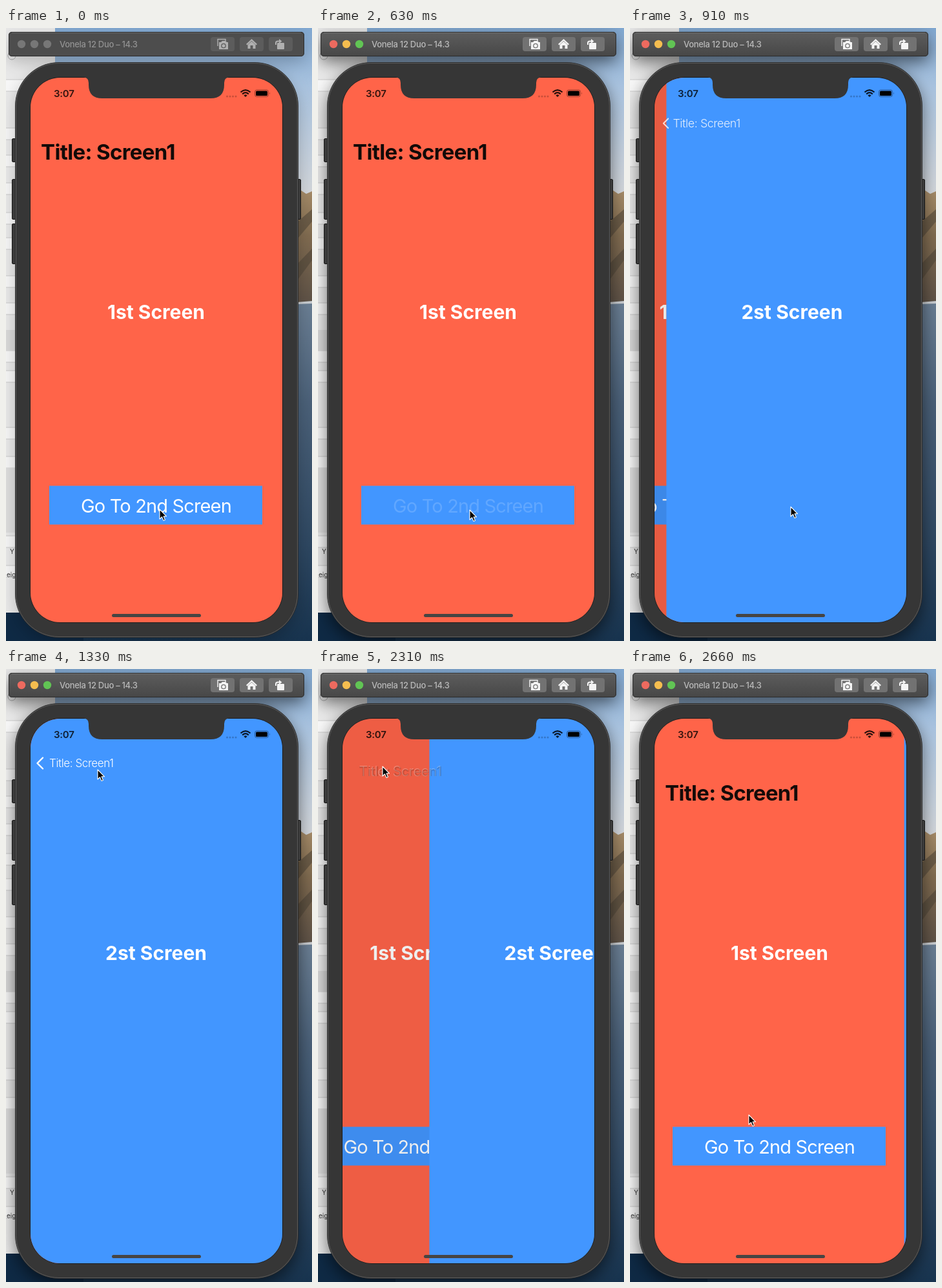
Animation of 474 by 950 pixels, one loop 2730 ms. Source, as an HTML page:

```html
<!DOCTYPE html>
<html lang="en">
<head>
<meta charset="utf-8">
<title>Screen navigation</title>
<style>
  html, body { margin: 0; width: 100%; height: 100%; overflow: hidden; background: #12304e; }
  svg { display: block; width: 474px; height: 950px; font-family: Inter, "Liberation Sans", sans-serif; }
  .heading { font-size: 30px; font-weight: 700; letter-spacing: 0; fill: #fff; text-anchor: middle; }
  .action { font-size: 29px; letter-spacing: -.85px; fill: #fff; text-anchor: middle; }
  .large { font-size: 33px; font-weight: 700; letter-spacing: -.65px; fill: #120a08; }
  .back { font-size: 17px; letter-spacing: -.4px; font-weight: 300; fill: #fff; }
  .clock { font-size: 15px; font-weight: 600; letter-spacing: -.25px; }
  .window { font-size: 13px; font-weight: 500; letter-spacing: -.3px; }
  .small { font-size: 10px; fill: #333; }
</style>
</head>
<body>
<svg viewBox="0 0 474 950" xmlns="http://www.w3.org/2000/svg">
  <defs>
    <linearGradient id="sky" x2="0" y2="1">
      <stop offset="0" stop-color="#82a9d2"/>
      <stop offset=".35" stop-color="#a9c3df"/>
      <stop offset="1" stop-color="#d3d6da"/>
    </linearGradient>
    <linearGradient id="rock" x2="0" y2="1">
      <stop offset="0" stop-color="#a58b68"/>
      <stop offset=".4" stop-color="#806b50"/>
      <stop offset="1" stop-color="#5d5146"/>
    </linearGradient>
    <linearGradient id="sea" x2="0" y2="1">
      <stop offset="0" stop-color="#6a7e93"/>
      <stop offset=".3" stop-color="#4a6078"/>
      <stop offset=".7" stop-color="#2f4862"/>
      <stop offset="1" stop-color="#17334e"/>
    </linearGradient>
    <linearGradient id="bar" x2="0" y2="1">
      <stop offset="0" stop-color="#5d5d5d"/>
      <stop offset="1" stop-color="#474747"/>
    </linearGradient>
    <clipPath id="display"><rect x="38" y="77" width="390" height="844" rx="46"/></clipPath>
    <filter id="shade" filterUnits="userSpaceOnUse" x="-60" y="-60" width="600" height="1080">
      <feDropShadow id="shadow" dx="0" dy="9" stdDeviation="13" flood-color="#000"/>
    </filter>
  </defs>

  <g id="desktop">
    <rect width="474" height="260" fill="url(#sky)"/>
    <path d="M440 262L456 251L465 257L474 253V428H440Z" fill="url(#rock)"/>
    <path d="M452 300L474 281V300L452 326ZM452 365L474 342V360L452 390Z" fill="#4d4438" opacity=".55"/>
    <rect y="425" width="474" height="525" fill="url(#sea)"/>
    <path d="M450 425L474 423V427L450 428Z" fill="#c8ccd0"/>
    <rect y="900" width="120" height="50" fill="#0e2944"/>
    <rect width="76" height="906" fill="#e9e9e9"/>
    <g id="rows"></g>
    <circle cx="9" cy="43" r="6" fill="none" stroke="#aaa"/>
    <text class="small" x="6" y="815">Y</text>
    <text class="small" x="1" y="851">eig</text>
  </g>

  <g filter="url(#shade)">
    <rect x="15" y="54" width="437" height="890" rx="67" fill="#363636"/>
    <rect x="4" y="6" width="458" height="38" rx="5" fill="#4d4d4d"/>
  </g>

  <g fill="#3b3b3b" stroke="#161616">
    <rect x="9.5" y="171.5" width="8" height="36" rx="1.5"/>
    <rect x="9.5" y="234.5" width="8" height="62" rx="1.5"/>
    <rect x="9.5" y="303.5" width="8" height="62" rx="1.5"/>
    <rect x="449.5" y="234.5" width="7" height="62" rx="1.5"/>
  </g>
  <rect x="14.5" y="53.5" width="438" height="891" rx="67.5" fill="#363636" stroke="#2a2a2a"/>
  <rect x="15.5" y="54.5" width="436" height="889" rx="66.500" fill="none" stroke="#5c5c5c"/>

  <rect x="37.5" y="76.5" width="391" height="845" rx="46.500" fill="none" stroke="#1e1e1e"/>
  <g clip-path="url(#display)">
    <g id="first">
      <rect x="38" y="77" width="390" height="844" fill="#ff6449"/>
      <text class="heading" x="232.5" y="451">1st Screen</text>
      <rect x="67" y="709.5" width="330" height="60" fill="#4296ff"/>
      <text id="action" class="action" x="232.5" y="751">Go To 2nd Screen</text>
    </g>
    <rect id="dim" x="38" y="77" width="390" height="844"/>
    <g id="second">
      <rect x="38" y="77" width="390" height="844" fill="#4296ff"/>
      <text class="heading" x="232.5" y="451">2st Screen</text>
    </g>
    <path id="chevron" d="M57 137.5L48.5 146L57 154.5" fill="none" stroke="#fff" stroke-width="2.4" stroke-linecap="round" stroke-linejoin="round"/>
    <text id="back" class="back">Title: Screen1</text>
    <text id="large" class="large">Title: Screen1</text>

    <g fill-opacity=".8">
      <text class="clock" x="74" y="107">3:07</text>
      <g fill-opacity=".22">
        <circle cx="342.5" cy="106" r="1.5"/><circle cx="347" cy="106" r="1.5"/>
        <circle cx="351.5" cy="106" r="1.5"/><circle cx="356" cy="106" r="1.5"/>
      </g>
      <g fill="none" stroke="#000" stroke-opacity=".85" stroke-width="2.2">
        <path d="M363.5 99.5Q371 92.8 378.5 99.5M366.2 102.3Q371 98.1 375.8 102.3"/>
      </g>
      <path d="M368.3 104.4Q371 102.2 373.7 104.4L371 107Z"/>
      <rect x="385.5" y="96" width="21" height="10.5" rx="3" fill="none" stroke="#000" stroke-opacity=".4"/>
      <rect x="387" y="97.5" width="18" height="7.5" rx="1.6" fill-opacity="1"/>
      <path d="M408 99.5q1.6 1.7 0 3.5z" fill-opacity=".4"/>
    </g>
    <rect x="164" y="908" width="138" height="5" rx="2.5" fill="#474543"/>
  </g>
  <path d="M120 76Q128 77 128 85V88Q128 109 149 109H317Q338 109 338 88V85Q338 77 346 76Z" fill="#363636"/>

  <g id="toolbar">
    <rect id="barFill" x="4.5" y="6.5" width="457" height="37" rx="4.5" stroke="#2b2b2b"/>
    <path d="M9 7.5H457" stroke="#888" stroke-opacity=".5"/>
    <circle class="light" cx="24" cy="25" r="6.2"/>
    <circle class="light" cx="44" cy="25" r="6.2"/>
    <circle class="light" cx="64" cy="25" r="6.2"/>
    <text id="label" class="window" x="83" y="30">Vonela 12 Duo – 14.3</text>
    <g id="keys">
      <rect x="317" y="14" width="37" height="22" rx="4"/>
      <rect x="362" y="14" width="37" height="22" rx="4"/>
      <rect x="407" y="14" width="37" height="22" rx="4"/>
    </g>
    <g id="icons">
      <path d="M328 28V17.500H340V20" fill="none" stroke-width="1.400"/>
      <path d="M330 22H333L335 20H340L342 22H344V33H330Z" stroke="none"/>
      <path d="M372 25L380.5 17L389 25L387.5 26.5L380.5 20L373.5 26.5ZM374.5 26L380.5 20.8L386.5 26V32H382.5V27H378.5V32H374.5Z" stroke="none"/>
      <rect x="420" y="23" width="11" height="10" rx="1" stroke="none"/>
      <path d="M417 26V23Q417 19.5 421 19.5H423V17L427.5 20.5L423 24V21.5H421Q419 21.5 419 23.5V26Z" stroke="none"/>
    </g>
    <circle id="lens" cx="337" cy="27.5" r="3.2" fill="none" stroke-width="1.3"/>
  </g>

  <path id="cursor" d="M0 0V15L3.500 11.700L6 17.400L8.400 16.300L6.100 10.800H10.600Z" stroke="#fff" stroke-width="1.1" stroke-linejoin="round"/>
</svg>
<script>
const LOOP = 2730, STEP = 70, WIDTH = 390;
const PUSH = 630, POP = 2241, SLIDE = 568;
const ACTIVATE = 280, PRESS = 560;

const el = id => document.getElementById(id);
const set = (node, attrs) => {
  for (const name in attrs) node.setAttribute(name, attrs[name]);
};
const clamp = v => Math.max(0, Math.min(1, v));
const mix = (a, b, k) => a + (b - a) * k;
const smooth = k => k * k * (3 - 2 * k);

// time, x, y of the pointer tip
const pointer = [
  [0, 238, 746], [490, 235, 747], [700, 235, 747], [910, 249, 742],
  [1330, 142, 156], [1890, 100, 151], [2310, 100, 151], [2660, 184, 691], [LOOP, 200, 710]
];
const lights = [...document.querySelectorAll(".light")];
const lightColors = ["#ed6a5f", "#f5bd4f", "#61c454"];

el("rows").innerHTML = [80, 155, 197, 240, 286, 325, 384, 426, 500, 531, 619, 664, 787, 833]
  .map(y => `<rect x="-1" y="${y}" width="78" height="18" fill="#f7f7f7" stroke="#c9c9c9"/>`)
  .join("") + '<rect y="468" width="76" height="32" fill="#dadada"/><rect y="682" width="76" height="100" fill="#dedede"/>';

// cubic-bezier(.32, .72, 0, 1)
function slide(x) {
  if (x <= 0 || x >= 1) return clamp(x);
  let low = 0, high = 1, s = 0.5;
  for (let i = 0; i < 24; i++) {
    s = (low + high) / 2;
    if (0.96 * (1 - s) ** 2 * s + s ** 3 < x) low = s; else high = s;
  }
  return 2.16 * (1 - s) ** 2 * s + 3 * (1 - s) * s * s + s ** 3;
}

function pointerAt(t) {
  const i = pointer.findIndex(p => p[0] > t);
  const a = pointer[i - 1], b = pointer[i];
  const k = smooth((t - a[0]) / (b[0] - a[0]));
  return [mix(a[1], b[1], k), mix(a[2], b[2], k)];
}

function drawWindow(active) {
  const icon = active ? "#f4f4f4" : "#b0b0b0", key = active ? "#727272" : "#5c5c5c";
  set(el("shadow"), { "flood-opacity": active ? 0.55 : 0.22 });
  set(el("barFill"), { fill: active ? "url(#bar)" : "#4d4d4d" });
  lights.forEach((light, i) => set(light, { fill: active ? lightColors[i] : "#777" }));
  set(el("label"), { fill: active ? "#b9b9b9" : "#929292" });
  set(el("keys"), { fill: key });
  set(el("icons"), { fill: icon, stroke: icon });
  set(el("lens"), { stroke: key });
}

function drawTitle(rest, morph) {
  const x = mix(67, 54, morph), middle = mix(146, 192, morph);
  const place = (id, scale, drop, opacity) => set(el(id), {
    transform: `translate(${x} ${middle + drop * scale}) scale(${scale})`, opacity
  });
  place("back", mix(1, 2.08, morph), 6, (1 - rest) ** 3);
  place("large", mix(0.481, 1, morph), 12.3, rest ** 1.7);
  const shrink = clamp(1 - rest * 3);
  set(el("chevron"), {
    transform: `translate(${52 + rest * 60} ${146 + rest * 36}) scale(${shrink}) translate(-52 -146)`,
    opacity: clamp(1 - rest * 5)
  });
}

function draw(t) {
  const popping = t >= POP;
  const rest = popping ? slide((t - POP) / SLIDE) : 1 - slide((t - PUSH) / SLIDE);
  set(el("first"), { transform: `translate(${-0.3 * WIDTH * (1 - rest)} 0)` });
  set(el("second"), { transform: `translate(${WIDTH * rest} 0)` });
  set(el("dim"), { opacity: 0.1 * (1 - rest) });
  set(el("action"), { opacity: t < PRESS ? 1 : mix(0.16, 1, clamp((t - PUSH) / 250)) });
  drawTitle(rest, popping ? rest ** 1.26 : rest);
  drawWindow(t >= ACTIVATE);
  set(el("cursor"), { transform: `translate(${pointerAt(t)})` });
}

const start = performance.now();
function tick() {
  const t = (performance.now() - start) % LOOP;
  draw(Math.floor(t / STEP) * STEP);
  requestAnimationFrame(tick);
}
tick();
</script>
</body>
</html>
```
